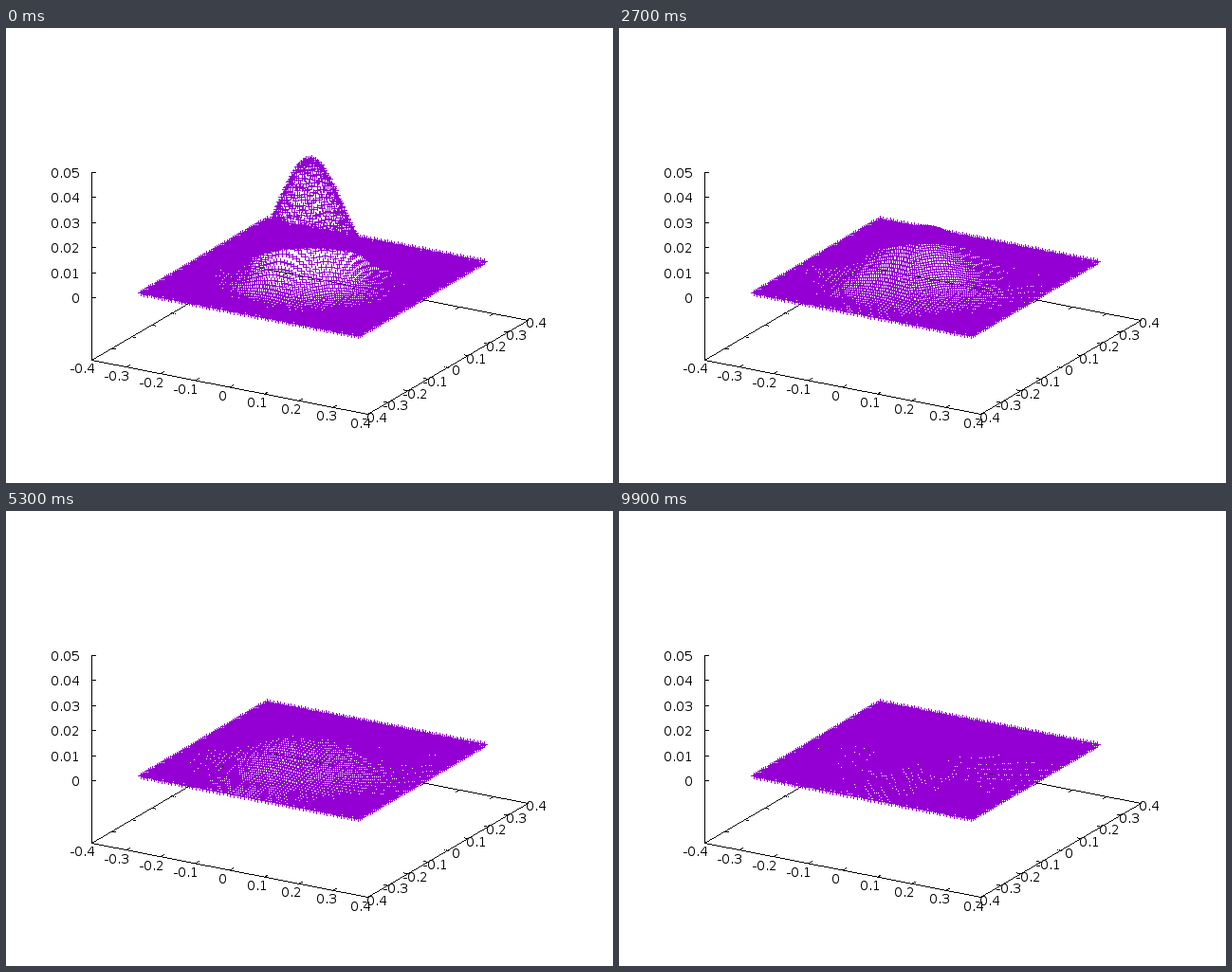
A matplotlib script for the animation above (10 s loop, 640 by 480 pixels).

```python
import numpy as np
import matplotlib.pyplot as plt
from matplotlib.animation import FuncAnimation

W, H, DPI = 640, 480, 100
PX = 72 / DPI
FRAMES, INTERVAL = 100, 100
BLACK = (0, 0, 0, 255)
PURPLE = (0x94, 0x00, 0xD3, 255)

# Diffusing, slowly damped bump on a 64 x 64 grid whose rim is held at zero
STEP = 0.01
PEAK, VARIANCE = 0.0475, 0.00625
RATE = 0.00012 / STEP**2
DAMPING = 0.0074
SUBSTEPS = 10

plt.rcParams["text.hinting"] = "default"
plt.rcParams["text.hinting_factor"] = 1

grid = np.arange(-31, 33) * STEP
X, Y = np.meshgrid(grid, grid)


def project(x, y, z=-0.025):
    """Map a data point to stage pixels, y downwards."""
    return (320 + 363.75 * x + 211.25 * y,
            263 + 71.25 * x - 123.75 * y - 2640 * z)


def diffuse(u):
    for _ in range(SUBSTEPS):
        lap = (u[2:, 1:-1] + u[:-2, 1:-1] + u[1:-1, 2:] + u[1:-1, :-2]
               - 4 * u[1:-1, 1:-1])
        u = u.copy()
        u[1:-1, 1:-1] += RATE / SUBSTEPS * lap
    return u * np.exp(-DAMPING)


def solve():
    u = PEAK * np.exp(-(X**2 + Y**2) / (2 * VARIANCE))
    u[[0, -1], :] = 0
    u[:, [0, -1]] = 0
    states = [u]
    while len(states) < FRAMES:
        states.append(diffuse(states[-1]))
    return states


def line(img, *points):
    """Draw a one-pixel polyline without smoothing."""
    for (x0, y0), (x1, y1) in zip(points, points[1:]):
        n = int(np.ceil(max(abs(x1 - x0), abs(y1 - y0)))) + 1
        col = np.rint(np.linspace(x0, x1, n)).astype(int)
        row = np.rint(np.linspace(y0, y1, n)).astype(int)
        img[row, col] = BLACK


def tick(img, p, dx, dy):
    line(img, p, (p[0] + dx, p[1] + dy))


def label(x, y, text, ha="center"):
    ax.text(x, y, text, ha=ha, va="center_baseline", fontsize=14 * PX,
            family="DejaVu Sans", color="black", zorder=3)


def draw_axes():
    img = np.zeros((H, W, 4), np.uint8)
    a = 0.4
    left, front = project(-a, -a), project(a, -a)
    right, back = project(a, a), project(-a, a)
    line(img, left, front, right)
    line(img, left, back, right)
    line(img, left, project(-a, -a, 0.05))

    for i in range(-4, 5):
        v = i / 10
        text = f"{v:g}"
        neg = i < 0

        p = project(v, -a)
        tick(img, p, 3.4, -2)
        tick(img, project(v, a), -3.4, 2)
        label(p[0] - 7 - 2.5 * neg, p[1] + 9, text)

        p = project(a, v)
        tick(img, p, -4, -0.8)
        tick(img, project(-a, v), 4, 0.8)
        label(p[0] + 9 - neg, p[1] + 3, text)

    for i in range(6):
        p = project(-a, -a, i / 100)
        tick(img, p, 4, 0)
        label(78.5, p[1] + 0.5, f"{i / 100:g}", ha="right")
    return img


def render(u):
    """Stamp a 7 px plus sign at every grid point, over the axes."""
    img = axes_img.copy()
    px, py = project(X, Y, u)
    col = np.rint(px).astype(int)
    row = np.rint(py).astype(int)
    for k in range(-3, 4):
        img[row, col + k] = PURPLE
        img[row + k, col] = PURPLE
    return img


fig = plt.figure(figsize=(W / DPI, H / DPI), dpi=DPI, facecolor="white")
ax = fig.add_axes([0, 0, 1, 1])
ax.axis("off")

axes_img = draw_axes()
states = solve()
picture = ax.imshow(render(states[0]), extent=(0, W, H, 0), aspect="auto",
                    interpolation="nearest", zorder=2)
ax.set_xlim(0, W)
ax.set_ylim(H, 0)


def update(frame):
    picture.set_data(render(states[frame]))
    return [picture]


anim = FuncAnimation(fig, update, frames=FRAMES, interval=INTERVAL,
                     repeat=True, repeat_delay=0)
plt.show()
```
